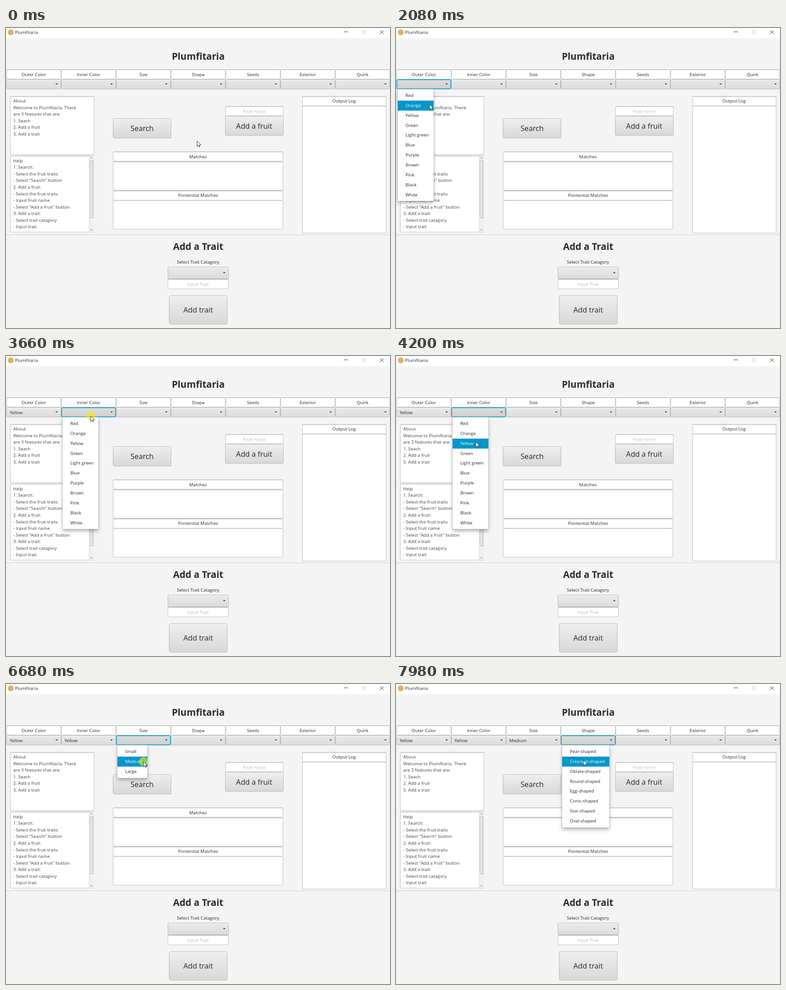
Recreate the animation shown at these times as an HTML page. Size 848x661 px, loop 8 s.

```html
<!DOCTYPE html>
<html lang="en">
<head>
<meta charset="utf-8">
<title>Plumfitaria</title>
<style>
html, body { margin: 0; width: 100%; height: 100%; overflow: hidden; background: #f4f4f4; }
body { font: 9.85px/14.55px "Open Sans", "Noto Sans", sans-serif; color: #262626; }
div { position: absolute; box-sizing: border-box; white-space: pre; }
svg { position: absolute; left: 0; top: 0; overflow: visible; }
.label, .field, .button, .combo { display: flex; align-items: center; justify-content: center; }
.title { font-size: 20.6px; font-weight: 700; color: #2b2b2b; }
.field, .area { background: #fff; border: 1px solid #c6c6c6; border-top-color: #b4b4b4; border-radius: 2.5px;
  box-shadow: inset 0 1px 2px #ddd; }
.prompt { color: #b3b8bb; }
.area { padding: 2.8px 6px; color: #404040; overflow: hidden; }
.button, .combo { border: 1px solid #b6b6b6; border-radius: 2.5px; box-shadow: inset 0 1px #f8f8f8;
  background: linear-gradient(#eeeeee, #d9d9d9); }
.button { font-size: 16.3px; padding-top: 1.5px; }
.combo { justify-content: flex-start; padding-left: 6px; background: linear-gradient(#eaeaea, #dcdcdc); }
.combo::after { content: ""; position: absolute; right: 6px; top: calc(50% - 1.8px);
  border: solid transparent; border-width: 3.5px 3px 0; border-top-color: #484848; }
.combo.hover { background: linear-gradient(#f8f8f8, #e8e8e8); }
.combo.open { background: linear-gradient(#dcdcdc, #cfcfcf); }
.combo.focus { border-color: #189fce; box-shadow: inset 0 0 0 .7px #189fce, 0 0 1.5px #7cc9e6; z-index: 1; }
.popup { background: #fff; z-index: 2; padding: 3px 0;
  box-shadow: 0 0 0 .6px #c4c4c4, 0 5px 8px rgba(0,0,0,.28), 0 0 3px rgba(0,0,0,.2); }
.popup div { position: static; height: 21.86px; line-height: 21.86px; padding-left: 17px; }
.popup .on { background: #0096c9; color: #fff; }
#pointer { z-index: 3; left: 0; top: 0; }
</style>
</head>
<body>
<script>
const LOOP = 8000;
const NAME = 'Plumfitaria';

function add(cls, x, y, w, h, text = '', parent = document.body) {
  const el = document.createElement('div');
  el.className = cls;
  el.style.cssText = `left:${x}px;top:${y}px;width:${w}px;height:${h}px`;
  el.textContent = text;
  parent.append(el);
  return el;
}
const fill = (x, y, w, h, css) => { add('', x, y, w, h).style.cssText += ';' + css; };

// Title bar
fill(0, 0, 848, 22, 'background:#fff');
fill(3.5, 2.5, 13, 13, 'background:#e6ad62;border-radius:50%');
add('label', 20, 2, 60, 14.5, NAME).style.justifyContent = 'flex-start';
document.body.insertAdjacentHTML('beforeend', `<svg width="848" height="22" fill="none" stroke="#333">
  <path d="M746 8.5h9M826 5l8 8M834 5L826 13"/><path d="M786.5 5.5h7v7h-7z" stroke="#ccc"/></svg>`);

// Trait selectors
add('label title', 300, 46, 249, 32, NAME);
const heads = ['Outer Color', 'Inner Color', 'Size', 'Shape', 'Seeds', 'Exterior', 'Quirk'];
const combos = heads.map((head, i) => {
  add('field', 1 + 121 * i, 91, 121, 22, head);
  return add('combo', 1 + 121 * i, 113, 121, 22);
});

// Left column
add('area', 9, 149.5, 186, 129, `About
Welcome to ${NAME}. There
are 3 features that are:
1. Seach
2. Add a fruit
3. Add a trait`);
add('area', 9, 281, 186, 169, `Help
1. Search:
- Select the fruit traits
- Select "Search" button
2. Add a fruit:
- Select the fruit traits
- Input fruit name
- Select "Add a fruit" button
3. Add a trait:
- Select trait catagory
- Input trait
- Select "Add trait" button`);
fill(183, 282, 11.5, 167, 'background:#f0f0f0;border-left:1px solid #ddd');
fill(184.5, 291, 8.5, 128, 'background:linear-gradient(90deg,#ececec,#dadada);border:1px solid #b8b8b8;border-radius:2px');
document.body.insertAdjacentHTML('beforeend', `<svg width="200" height="450" fill="none" stroke="#777">
  <path d="M185.5 287.5l3-3 3 3M185.5 443l3 3 3-3"/></svg>`);

// Middle and right columns
add('button', 236, 199, 129, 43.5, 'Search');
add('field prompt', 483.5, 172, 129, 22, 'Fruit name');
add('button', 483.5, 194, 129, 43, 'Add a fruit');
add('field', 236, 272, 376, 22, 'Matches');
add('area', 236, 293.5, 376, 64);
add('field', 236, 357.5, 376, 22, 'Pontential Matches');
add('area', 236, 379, 376, 64.5);
add('field', 653.5, 149.5, 186, 22, 'Output Log');
add('area', 653.5, 171, 186, 280.5);
fill(0, 455, 848, 1, 'background:#cfcfcf');

// Lower panel
add('label title', 300, 465, 249, 32, 'Add a Trait');
add('label', 357, 507, 134, 16, 'Select Trait Catagory');
add('combo', 356.5, 526, 135, 27);
add('field prompt', 356.5, 553, 135, 22, 'Input Trait');
add('button', 360, 588.5, 129, 64, 'Add trait');

// Popups
const colors = 'Red,Orange,Yellow,Green,Light green,Blue,Purple,Brown,Pink,Black,White';
const shapes = ['Pear', 'Crescent', 'Oblate', 'Round', 'Egg', 'Conic', 'Star', 'Oval'];
const ITEM = 21.86, FIRST = 138;
const popups = [
  [79, colors.split(',')],
  [79, colors.split(',')],
  [65.5, ['Small', 'Medium', 'Large']],
  [103.5, shapes.map(s => s + '-shaped')],
].map(([w, items], i) => {
  const el = add('popup', 4 + 121 * i, FIRST - 3, w, items.length * ITEM + 6);
  for (const item of items) el.append(Object.assign(document.createElement('div'), { textContent: item }));
  return el;
});

// Pointer
document.body.insertAdjacentHTML('beforeend', `<svg id="pointer" width="20" height="20">
  <circle r="10" fill="#f5eb14" fill-opacity=".62"/>
  <path id="arrow" d="M0 0V11.8L2.8 9.2 4.6 13.2 6.4 12.4 4.7 8.5H8.4Z" fill="#fff" stroke="#222" stroke-width=".9"/>
  <path id="beam" d="M-2.5-5.5H-.5L0-5 .5-5.5H2.5M0-5V5M-2.5 5.5H-.5L0 5 .5 5.5H2.5" fill="none" stroke="#333"/></svg>`);
const pointer = document.getElementById('pointer');
const [halo, arrow, beam] = pointer.children;

// Time, x, y of the pointer
const path = [
  [0, 422, 249], [620, 422, 249], [1220, 111, 126], [1390, 106, 123], [1640, 106, 123],
  [2160, 72, 171], [2370, 72, 171], [2500, 68, 190], [2740, 68, 190], [2800, 68, 193],
  [3380, 187, 132], [3920, 187, 132], [4200, 176, 189], [4580, 176, 189], [5290, 344, 131],
  [5320, 344, 131], [5550, 325, 129], [5700, 325, 129], [6120, 304, 168], [6150, 304, 168],
  [6220, 303.5, 171], [6760, 303.5, 171], [7400, 413, 128], [7700, 413, 128], [7970, 414, 168], [LOOP, 414, 168],
];
// Clicks alternate: open a list, choose from it
const clicks = [1490, 2660, 3580, 4500, 5580, 6680, 7420];
const picks = ['Yellow', 'Yellow', 'Medium'];

function pointerAt(t) {
  const k = path.findIndex(p => p[0] > t);
  const [t0, x0, y0] = path[k - 1], [t1, x1, y1] = path[k];
  const u = (t - t0) / (t1 - t0), s = u * u * (3 - 2 * u);
  return [x0 + (x1 - x0) * s, y0 + (y1 - y0) * s];
}

const show = (el, on) => { el.style.visibility = on ? 'visible' : 'hidden'; };

function draw(now) {
  const t = now % LOOP;
  const [x, y] = pointerAt(t);
  const done = clicks.filter(c => t >= c + 80).length;
  const active = done ? (done - 1) >> 1 : -1;
  const open = done % 2 ? active : -1;

  combos.forEach((el, i) => {
    const over = y >= 113 && y < 135 && Math.floor((x - 1) / 121) === i;
    el.textContent = i < done >> 1 ? picks[i] : '';
    el.classList.toggle('focus', i === active);
    el.classList.toggle('open', i === open);
    el.classList.toggle('hover', over && open < 0);
  });
  const row = Math.floor((y - FIRST) / ITEM);
  popups.forEach((el, i) => {
    show(el, i === open);
    [...el.children].forEach((item, j) => item.classList.toggle('on', j === row));
  });

  const overText = open < 0 && x > 9 && x < 195 && y > 150 && y < 278;
  show(arrow, !overText);
  show(beam, overText);
  show(halo, clicks.some(c => t >= c && t < c + 120));
  pointer.style.transform = `translate(${x}px, ${y}px)`;
  requestAnimationFrame(() => draw(performance.now()));
}
draw(performance.now());
</script>
</body>
</html>
```
